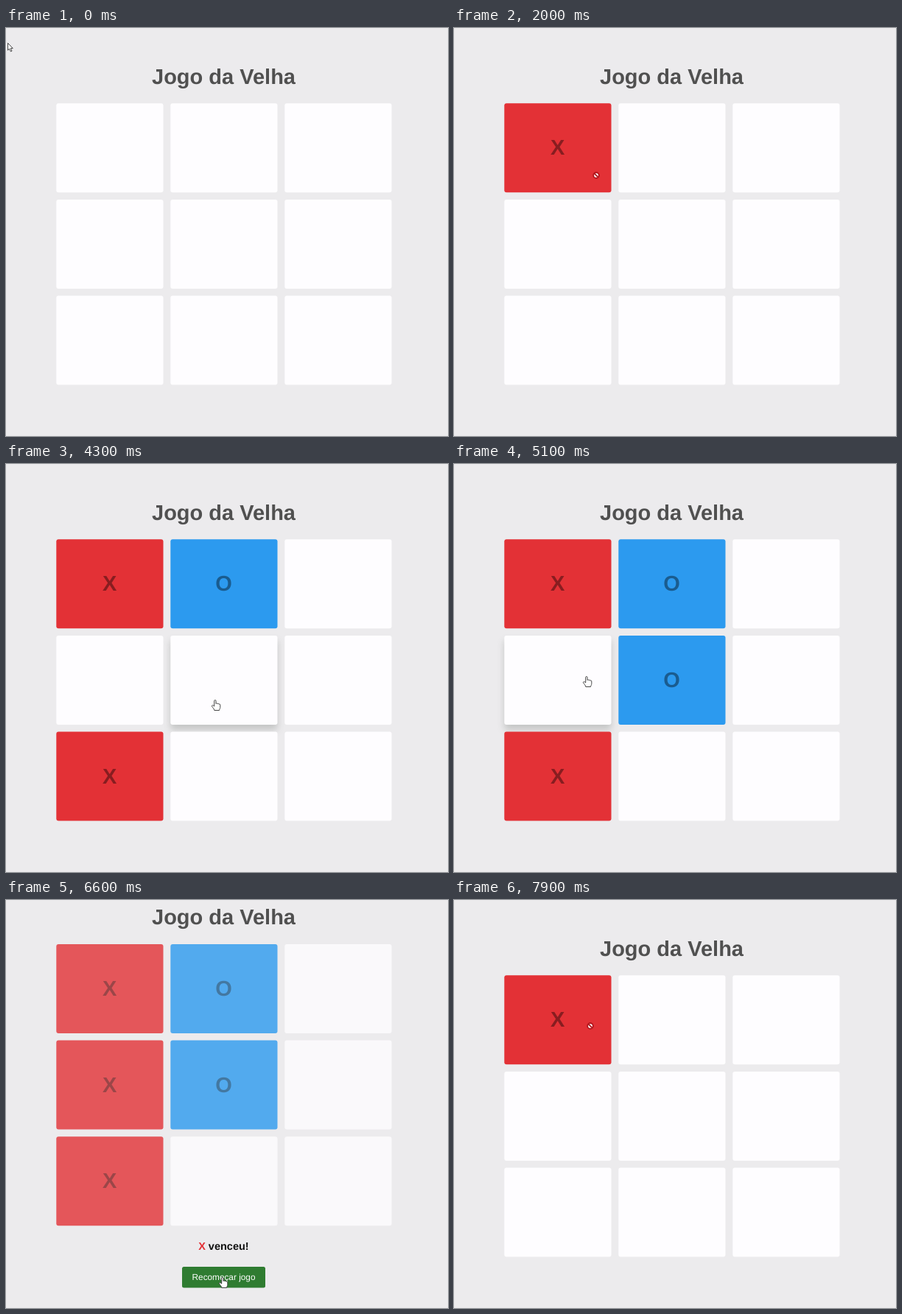
An HTML page for the animation above (8000 ms loop, 600 by 554 pixels).

```html
<!DOCTYPE html>
<html lang="pt">
<head>
<meta charset="utf-8">
<title>Jogo da Velha</title>
<style>
  html, body { margin: 0; width: 100%; height: 100%; overflow: hidden; background: #ecebed; }
  svg { display: block; width: 600px; height: 554px; font-family: "Liberation Sans", Arial, sans-serif; cursor: default; }
  text { text-anchor: middle; text-rendering: geometricPrecision; }
  .title, .mark { font-size: 29px; font-weight: bold; }
  .title { fill: #505050; }
  .mark { fill: rgba(0, 0, 0, .4); }
  .cell rect { fill: #fefdff; }
  .cell.X rect { fill: #e33136; }
  .cell.O rect { fill: #2c9aef; }
  .cell.hover rect { filter: drop-shadow(0 7px 5px rgba(40, 50, 40, .2)); }
  .over .cell { opacity: .8; }
  #result { visibility: hidden; }
  .over #result { visibility: visible; }
  .message { font-size: 14.5px; font-weight: bold; fill: #111; }
  .message tspan { fill: #e33136; }
  #button rect { fill: #51be52; }
  #button.hover rect { fill: #2f7c31; }
  #button text { font-size: 11.8px; fill: #fff; }
  .cursor { visibility: hidden; fill: #fff; stroke: #333; stroke-width: .9; stroke-linejoin: round; }
  .cursor.on { visibility: visible; }
  #blocked { stroke: #b3141b; stroke-width: 1.9; }
</style>
</head>
<body>
<svg viewBox="0 0 600 554">
  <g id="game">
    <text class="title" x="295.5" y="75.7">Jogo da Velha</text>
    <g id="board"></g>
  </g>
  <g id="result">
    <text class="message" x="295.4" y="475"><tspan>X</tspan> venceu!</text>
    <g id="button">
      <rect x="239" y="498" width="113" height="28.5" rx="2.5"/>
      <text x="295.5" y="516">Recomeçar jogo</text>
    </g>
  </g>
  <g id="pointer">
    <path class="cursor" id="arrow" d="M.5 .5V10.2L2.7 8.2 4.3 11.9 6 11.2 4.4 7.6H7.3Z"/>
    <path class="cursor" id="hand" d="M-1.3 9V1.6C-1.3 .2 1 .2 1 1.6V5.4C1.3 4.5 3 4.7 3.1 5.8 3.6 5 5 5.2 5.1 6.3 5.6 5.6 6.8 6 6.8 7.1V10.4C6.8 12 5.7 12.6 5.5 14.5H-1.2C-1.4 12.5-3.3 11-4.5 8.9-5 7.9-3.6 7.1-2.7 7.9Z"/>
    <path class="cursor" id="beam" d="M-2.5-7.5H2.5M0-7.5V7.5M-2.5 7.5H2.5"/>
    <g class="cursor" id="blocked" transform="translate(1 5)">
      <circle r="3.8"/>
      <path d="M-2.7-2.7 2.7 2.7"/>
    </g>
  </g>
</svg>
<script>
const LOOP = 8000, STEP = 100, LIFT = 42.3;
const CELL = { w: 145.2, h: 121 };
const $ = id => document.getElementById(id);

// Stops of the pointer: step of arrival, x, y, steps of rest
const stops = [
  [0, 2, 20], [2, 532, 244, 1], [4, 246, 75], [5, 556, 285, 1], [7, 588, 292],
  [12, 150, 270], [14, 192, 195, 7], [24, 262, 76], [26, 345, 150], [28, 305, 210, 4],
  [33, 281, 253], [41, 140, 424], [43, 284, 320], [45, 292, 300], [47, 345, 66],
  [51, 180, 288], [54, 168, 305], [59, 288, 510], [66, 294, 512, 2],
  [70, 330, 330], [72, 270, 72], [74, 184, 166, 6]
];
const clicks = [20, 31, 40, 45, 53, 67, 79];

const cells = Array.from({ length: 9 }, (_, i) => {
  const x = 68.3 + 155 * (i % 3), y = 102.2 + 130.7 * Math.floor(i / 3);
  $("board").insertAdjacentHTML("beforeend",
    `<g class="cell"><rect x="${x}" y="${y}" width="${CELL.w}" height="${CELL.h}" rx="3"/>
     <text class="mark" x="${x + 72.3}" y="${y + 70}"></text></g>`);
  const node = $("board").lastElementChild;
  return { x, y, node, label: node.querySelector("text") };
});

const inside = (p, x, y, w, h) => p.x >= x && p.x <= x + w && p.y >= y && p.y <= y + h;
const onCell = (p, cell, lift) => inside(p, cell.x, cell.y - lift, CELL.w, CELL.h);

function pointerAt(step) {
  const i = stops.findLastIndex(s => s[0] <= step);
  const [t0, x0, y0, rest = 0] = stops[i];
  const [t1, x1, y1] = stops[i + 1] || [LOOP / STEP, x0, y0];
  const k = Math.max(0, (step - t0 - rest) / (t1 - t0 - rest || 1));
  return { x: x0 + (x1 - x0) * k, y: y0 + (y1 - y0) * k };
}

function hasWinner(marks) {
  const row = (a, d) => marks[a] && marks[a] === marks[a + d] && marks[a] === marks[a + 2 * d];
  return [0, 1, 2].some(i => row(3 * i, 1) || row(i, 3)) || row(0, 4) || row(2, 2);
}

// Replays the clicks made so far; the click after a win restarts the game
function marksAt(step) {
  let marks = [];
  for (const click of clicks.filter(c => c <= step)) {
    if (hasWinner(marks)) { marks = []; continue; }
    const turn = marks.filter(Boolean).length;
    marks[cells.findIndex(cell => onCell(pointerAt(click), cell, 0))] = "XO"[turn % 2];
  }
  return marks;
}

function render(step) {
  const marks = marksAt(step), p = pointerAt(step);
  const over = hasWinner(marks), lift = over ? LIFT : 0;
  const onButton = over && inside(p, 239, 498, 113, 28);
  let cursor = onButton ? "hand" : inside(p, 198, 50 - lift, 194, 30) ? "beam" : "arrow";

  cells.forEach((cell, i) => {
    const player = marks[i] || "", under = onCell(p, cell, lift);
    const free = under && !player && !over;
    if (under) cursor = free ? "hand" : "blocked";
    cell.label.textContent = player;
    cell.node.setAttribute("class", `cell ${player} ${free ? "hover" : ""}`);
  });

  document.querySelector("svg").classList.toggle("over", over);
  $("game").setAttribute("transform", `translate(0 ${-lift})`);
  $("button").classList.toggle("hover", onButton);
  $("pointer").setAttribute("transform", `translate(${Math.round(p.x)} ${Math.round(p.y)})`);
  document.querySelectorAll(".cursor").forEach(c => c.classList.toggle("on", c.id === cursor));
}

function tick() {
  render(Math.floor(performance.now() % LOOP / STEP));
  requestAnimationFrame(tick);
}
tick();
</script>
</body>
</html>
```
